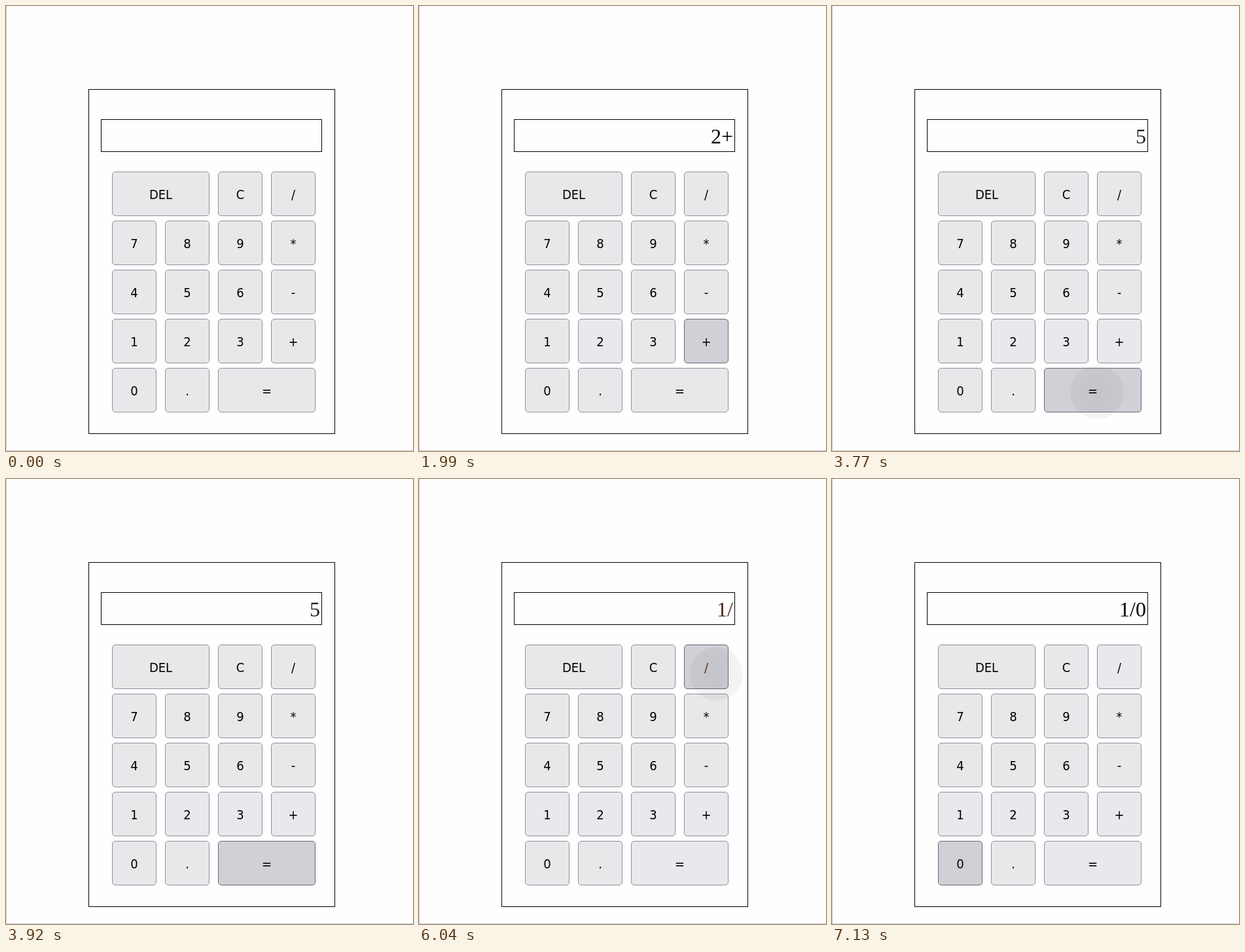
Write an HTML page that moves like this. It is 622 px wide and 680 px high and loops after 8 s.

```html
<!DOCTYPE html>
<html lang="en">
<head>
<meta charset="utf-8">
<title>Calculator</title>
<style>
  html, body { margin: 0; width: 100%; height: 100%; overflow: hidden; background: #fefefe; }
  svg { display: block; }
  .box { fill: #fefefe; stroke: #000; }
  .key rect { fill: #e8e8ea; stroke: #8f8f9d; }
  .key.used rect { fill: #e8e8ed; }
  .key.down rect { fill: #d0d0d7; stroke: #676774; }
  .key text { font: 20px "DejaVu Sans Condensed", "DejaVu Sans", sans-serif; font-stretch: condensed; text-anchor: middle; }
  #out { font: 32px "Liberation Serif", serif; text-anchor: end; }
</style>
</head>
<body>
<svg id="stage" width="622" height="680">
  <radialGradient id="glow">
    <stop offset="0" stop-opacity=".06"/>
    <stop offset="1" stop-opacity=".04"/>
  </radialGradient>
  <path d="M.5 0V679.5H622" fill="none" stroke="#c8c8c8"/>
  <rect class="box" x="126.5" y="127.5" width="376" height="526"/>
  <rect class="box" x="145.5" y="173.5" width="337" height="49"/>
  <text id="out" x="480" y="210"></text>
  <g id="keys"></g>
  <circle id="ripple" r="41" fill="url(#glow)"/>
</svg>
<script>
const LOOP = 8000;
const $ = id => document.getElementById(id);
const out = $('out'), ripple = $('ripple'), keys = {};

// Each row lists its keys; a label followed by "_" spans two columns.
['DEL _ C /', '7 8 9 *', '4 5 6 -', '1 2 3 +', '0 . = _'].forEach((row, r) => {
  const cells = row.split(' ');
  cells.forEach((label, c) => {
    if (label === '_') return;
    const w = cells[c + 1] === '_' ? 148 : 67;
    const x = 162.5 + 81 * c, y = 253.5 + 75 * r;
    $('keys').insertAdjacentHTML('beforeend',
      `<g class="key"><rect x="${x}" y="${y}" width="${w}" height="67" rx="4.5"/>` +
      `<text x="${x + w / 2}" y="${y + 41.5}">${label}</text></g>`);
    keys[label] = $('keys').lastChild;
  });
});

// time, pressed key, display, ripple centre and duration, tinted ink duration
const presses = [
  { at: 1220, key: '2', show: '2', x: 281, y: 525, hold: 80 },
  { at: 1990, key: '+', show: '2+' },
  { at: 2840, key: '3', show: '2+3', x: 362, y: 525, hold: 150 },
  { at: 3770, key: '=', show: '5', x: 405, y: 590, hold: 150 },
  { at: 4950, key: '1', show: '1', x: 196, y: 531, hold: 160 },
  { at: 6040, key: '/', show: '1/', x: 454, y: 298, hold: 150, tint: 80 },
  { at: 7050, key: '0', show: '1/0', x: 210, y: 583, hold: 80 },
];

function draw(t) {
  const past = presses.filter(p => p.at <= t);
  const last = past[past.length - 1];
  const age = last ? t - last.at : 0;
  const tinted = last && age < (last.tint || 0);

  for (const label in keys) {
    const down = !!last && last.key === label;
    keys[label].classList.toggle('down', down);
    keys[label].classList.toggle('used', past.some(p => p.key === label));
    keys[label].lastChild.style.fill = down && tinted ? '#5a3220' : '#000';
  }
  out.textContent = last ? last.show : '';
  out.style.fill = tinted ? '#4a2a1c' : last && last.key === '=' ? '#222' : '#000';

  const lit = last && age < (last.hold || 0);
  ripple.style.display = lit ? '' : 'none';
  if (lit) {
    ripple.setAttribute('cx', last.x);
    ripple.setAttribute('cy', last.y);
  }
}

const start = performance.now();
function tick() {
  draw((performance.now() - start) % LOOP);
  requestAnimationFrame(tick);
}
tick();
</script>
</body>
</html>
```
